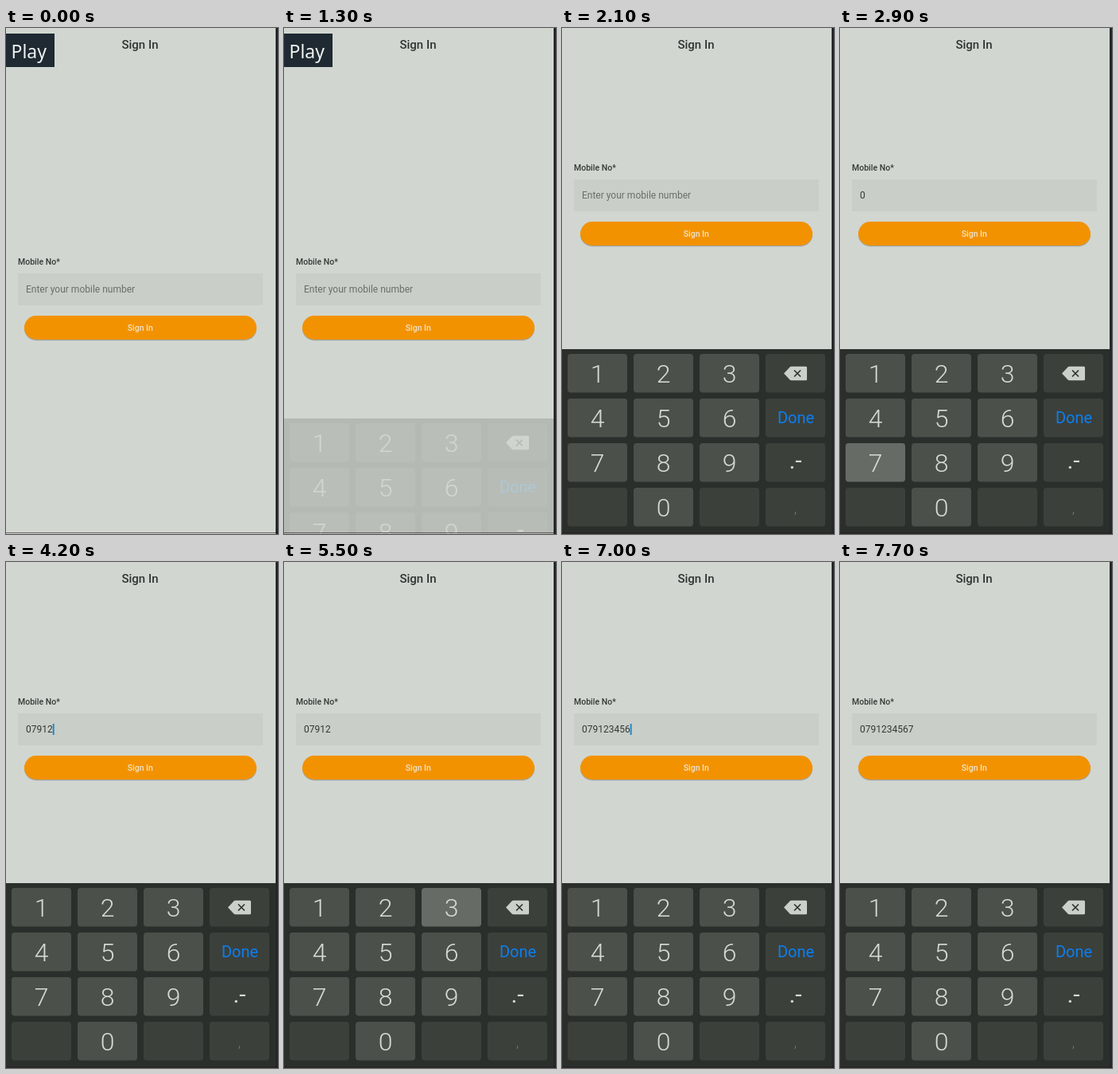
These frames come from a looping animation (342x635 px, 8000 ms). An HTML page:

```html
<!DOCTYPE html>
<html lang="en">
<head>
<meta charset="utf-8">
<title>Sign In</title>
<style>
  html, body { margin: 0; height: 100%; overflow: hidden; background: #d1d6d0; }
  svg { display: block; width: 342px; height: 635px; font-family: Roboto, sans-serif; }
  .mid { text-anchor: middle; }
  .digit { font-size: 32px; font-weight: 300; fill: #d6dad5; }
</style>
</head>
<body>
<svg viewBox="0 0 342 635">
  <rect width="342" height="635" fill="#d1d6d0"/>
  <text class="mid" x="168.5" y="26.3" font-size="15" font-weight="500" fill="#303431">Sign In</text>

  <g id="form">
    <text x="15" y="297.3" font-size="10.5" font-weight="500" fill="#363a36">Mobile No*</text>
    <rect x="15" y="308" width="308" height="40" fill="#c9cec8"/>
    <text id="value" x="25" y="332" font-size="12"></text>
    <rect id="cursor" y="321" width="2" height="14" fill="#2389c6"/>
    <rect x="23" y="362.5" width="292" height="30" rx="15" fill="#5a5e5a" opacity=".18"/>
    <rect x="23" y="362" width="292" height="30" rx="15" fill="#5a5e5a" opacity=".3"/>
    <rect x="23" y="361" width="292" height="30" rx="15" fill="#f39200"/>
    <text class="mid" x="168.8" y="380" font-size="10.5" font-weight="500" fill="#efe3cb">Sign In</text>
  </g>

  <g id="keyboard">
    <rect y="403" width="340" height="232" fill="#2b2f2b"/>
    <g id="keys"></g>
    <path d="M279 433.5 286.5 425.5Q287.5 424.7 288.5 424.7H306.5Q308 424.7 308 426.2V440.8Q308 442.3 306.5 442.3H288.5Q287.5 442.3 286.5 441.5Z" fill="#cbd0ca"/>
    <path d="M292 429.5l8 8m0-8l-8 8" stroke="#2f332f" stroke-width="1.7"/>
    <text class="mid" x="294" y="496.3" font-size="20" fill="#0b7ff0">Done</text>
    <text class="mid" x="293.5" y="553" font-size="30" fill="#d6dad5">.-</text>
    <text class="mid" x="293.5" y="609" font-size="18" font-weight="300" fill="#737872">,</text>
  </g>

  <g id="play">
    <rect y="7" width="61" height="42" fill="#1f2a32"/>
    <text x="6.5" y="38.3" font-size="23" fill="#f0f3f2" style="font-family: 'Noto Sans', 'Open Sans', sans-serif">Play</text>
  </g>
  <rect x="339" width="3" height="635" fill="#23282b"/>
  <rect y="633" width="342" height="1" fill="#2a1722" opacity=".6"/>
</svg>

<script>
const LOOP = 8000, STEP = 100, BLINK = 400;
const HINT = 'Enter your mobile number';
const DIGIT_WIDTH = 6.74;

// digit, press time, time it appears, optional later start of the cursor blink
const typing = [
  [0, 2300, 2500], [7, 2800, 3000], [9, 3200, 3200], [1, 3800, 3900], [2, 4000, 4200],
  [3, 5500, 5600], [4, 5800, 5900], [5, 6200, 6300, 6400], [6, 6800, 7000], [7, 7100, 7300],
];

const $ = id => document.getElementById(id);
const form = $('form'), value = $('value'), cursor = $('cursor');
const keyboard = $('keyboard'), play = $('play');

function add(name, attributes, text = '') {
  const node = document.createElementNS('http://www.w3.org/2000/svg', name);
  for (const key in attributes) node.setAttribute(key, attributes[key]);
  node.textContent = text;
  return $('keys').appendChild(node);
}

const digitKeys = {};
for (let i = 0; i < 16; i++) {
  const col = i % 4, row = i >> 2;
  const x = 7 + col * 83, y = 409 + row * 56;
  const label = col === 3 ? '' : row < 3 ? row * 3 + col + 1 : col === 1 ? 0 : '';
  const key = add('rect', { x, y, width: 75, height: 48.5, rx: 4, fill: label === '' ? '#3c403b' : '#4b504a' });
  if (label === '') continue;
  digitKeys[label] = key;
  add('text', { class: 'mid digit', x: x + 37.5, y: y + 35.5 }, label);
}

function draw(t) {
  const typed = typing.filter(([, , shown]) => t >= shown);
  const number = typed.map(([digit]) => digit).join('');
  value.textContent = number || HINT;
  value.setAttribute('fill', number ? '#343834' : '#6a6f6a');

  const [, , shown, blinkStart = shown] = typed.at(-1) || [0, 0, 1600];
  const on = t >= 1500 && Math.floor((t - blinkStart) / BLINK) % 2 < 1;
  cursor.setAttribute('x', 25 + number.length * DIGIT_WIDTH);
  cursor.setAttribute('opacity', on ? 1 : 0);

  form.setAttribute('transform', `translate(0 ${t < 1600 ? 0 : -118})`);

  const rise = Math.min(1, Math.max(0, (t - 1300) / 200));
  keyboard.setAttribute('transform', `translate(0 ${87 * (1 - rise) ** 2})`);
  keyboard.setAttribute('opacity', t < 1300 ? 0 : 0.17 + 0.83 * rise);

  play.setAttribute('opacity', t < 2000 ? 1 : t < 2100 ? 0.5 : 0);

  const pressed = typing.find(([, down, up]) => t >= down && t < up);
  for (const digit in digitKeys)
    digitKeys[digit].setAttribute('fill', pressed && pressed[0] == digit ? '#666b65' : '#4b504a');
}

const start = performance.now();
function frame() {
  const t = (performance.now() - start) % LOOP;
  draw(Math.floor(t / STEP) * STEP);
  requestAnimationFrame(frame);
}
frame();
</script>
</body>
</html>
```
